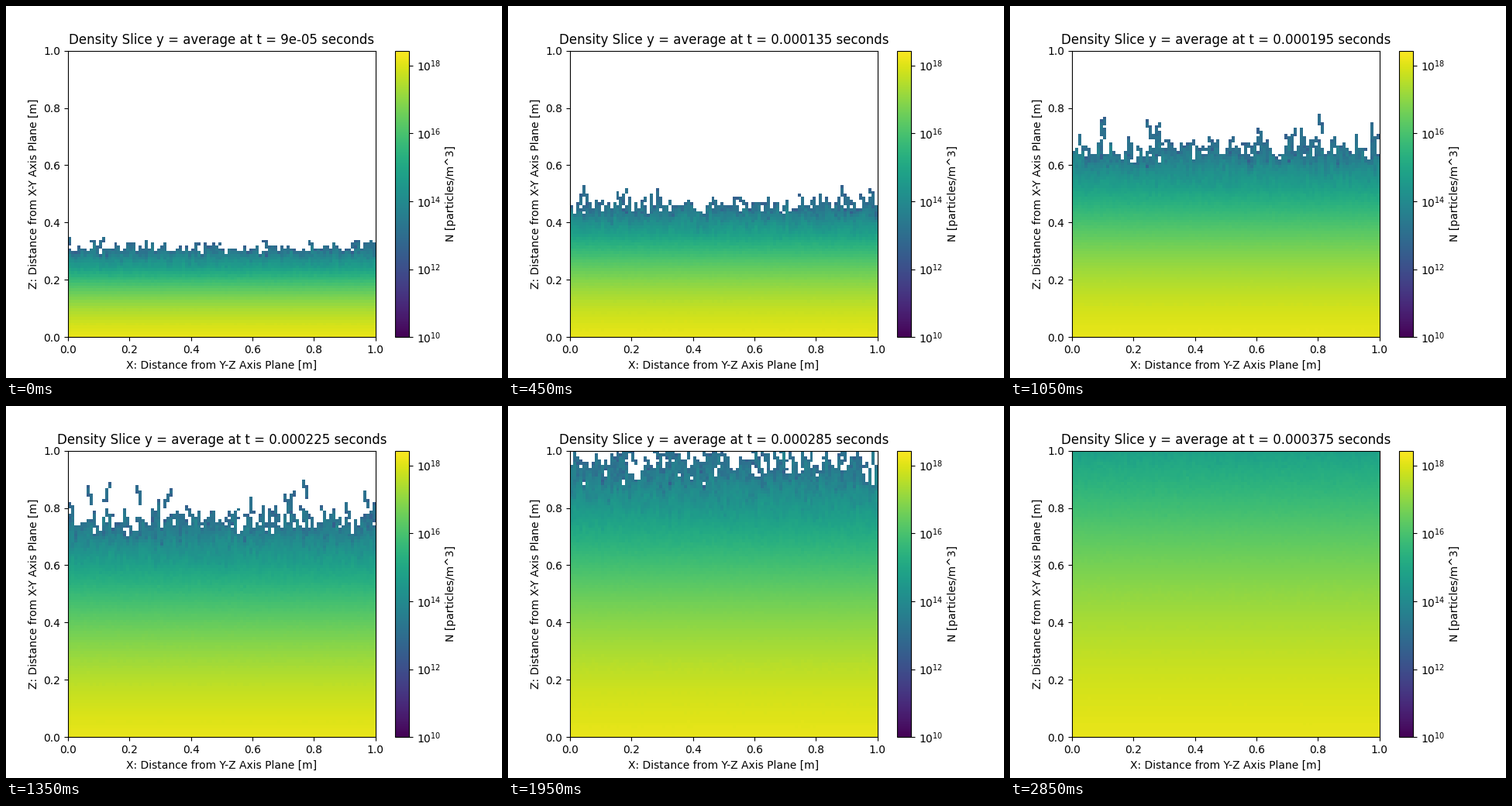
A matplotlib script that plays this animation: 640x480 px, repeating every 3 s.

```python
import math

import matplotlib.pyplot as plt
import numpy as np
from matplotlib.animation import FuncAnimation
from matplotlib.colors import LogNorm

FRAMES, INTERVAL = 20, 150
CELLS = 100
T_START, T_STEP = 9e-5, 1.5e-5
N_MIN, N_MAX = 1e10, 2.7e18

V_TH = 1075.0          # thermal speed, m/s
N_WALL = N_MAX / 2     # density at the emitting plane
WEIGHT = 8.4e13        # density carried by one particle in one cell
CUT_LOW, CUT_HIGH = 2.5, 3.4   # speed range followed particle by particle
SAMPLES = 24           # positions averaged over one time step

# Fastest particles: x and z at T_START, then vx and vz in m/s
LEADERS = np.array([
    (0.940, 0.335, -1330, 4190),
    (0.115, 0.350, 1640, 3790),
    (0.005, 0.347, 950, 3960),
    (0.315, 0.330, -650, 4030),
    (0.985, 0.340, -120, 3850),
    (0.200, 0.325, -1010, 4060),
    (0.670, 0.315, -580, 3890),
    (0.866, 0.322, -1200, 3880),
    (0.690, 0.288, 300, 4200),
])

erfc = np.vectorize(math.erfc)
z_mid = (np.arange(CELLS) + 0.5) / CELLS


def emit_particles(rng):
    """Fast particles leaving z = 0 with a flux-weighted Maxwellian speed."""
    t_end = T_START + T_STEP * FRAMES
    flux = N_WALL / WEIGHT * V_TH * CELLS * math.exp(-CUT_LOW**2)
    count = int(flux * t_end / math.sqrt(math.pi) * CELLS)
    speed = np.sqrt(CUT_LOW**2 - np.log(1 - rng.random(count)))
    speed = speed[speed < CUT_HIGH]
    n = len(speed)
    return (rng.random(n), rng.normal(0, V_TH / math.sqrt(2), n),
            speed * V_TH, rng.random(n) * t_end)


def deposit(x, z):
    """Mean density on the grid from sampled particle positions."""
    inside = (z > 0) & (z < 1)
    ix = (x[inside] % 1 * CELLS).astype(int) % CELLS
    iz = (z[inside] * CELLS).astype(int)
    hits = np.bincount(iz * CELLS + ix, minlength=CELLS**2)
    return hits.reshape(CELLS, CELLS) * WEIGHT / SAMPLES


def fast_density(t, particles):
    x0, vx, vz, born = particles
    half = T_STEP / 2
    active = (born < t + half) & (vz * (t - half - born) < 1)
    x0, vx, vz, born = (a[active] for a in particles)
    offsets = ((np.arange(SAMPLES) + 0.5) / SAMPLES - 0.5) * T_STEP
    age = t + offsets[:, None] - born
    return deposit(x0 + vx * age, vz * age)


def leader_density(t):
    x0, z0, vx, vz = LEADERS.T
    back = (np.arange(SAMPLES) + 0.5) / SAMPLES * T_STEP
    age = t - T_START - back[:, None]
    return deposit(x0 + vx * age, z0 + vz * age)


def bulk_density(t, rng):
    """Smooth free expansion of the slower gas, with counting noise."""
    mean = N_WALL * (erfc(z_mid / (V_TH * t)) - math.erfc(CUT_LOW))
    mean = np.maximum(mean, 0)[:, None]
    noise = rng.normal(size=(CELLS, CELLS)) * np.sqrt(mean * WEIGHT * 0.15)
    return np.maximum(mean + noise, 0)


def density(i, particles):
    t = T_START + T_STEP * i
    total = (bulk_density(t, np.random.default_rng(100 + i))
             + fast_density(t, particles) + leader_density(t))
    return np.ma.masked_less(total, N_MIN)


particles = emit_particles(np.random.default_rng(7))
slices = [density(i, particles) for i in range(FRAMES)]

fig, ax = plt.subplots(figsize=(6.4, 4.8), dpi=100)
edges = np.linspace(0, 1, CELLS + 1)
mesh = ax.pcolormesh(edges, edges, slices[0], cmap="viridis",
                     norm=LogNorm(N_MIN, N_MAX))
ax.set(xlim=(0, 1), ylim=(0, 1),
       xlabel="X: Distance from Y-Z Axis Plane [m]",
       ylabel="Z: Distance from X-Y Axis Plane [m]")
bar = fig.colorbar(mesh, ax=ax, label="N [particles/m^3]",
                   ticks=[1e10, 1e12, 1e14, 1e16, 1e18])
bar.ax.minorticks_off()
title = ax.set_title("")


def update(i):
    mesh.set_array(slices[i])
    t = T_START + T_STEP * i
    title.set_text(f"Density Slice y = average at t = {t:.3g} seconds")
    return mesh, title


anim = FuncAnimation(fig, update, frames=FRAMES, interval=INTERVAL,
                     repeat=True, repeat_delay=0)
plt.show()
```
